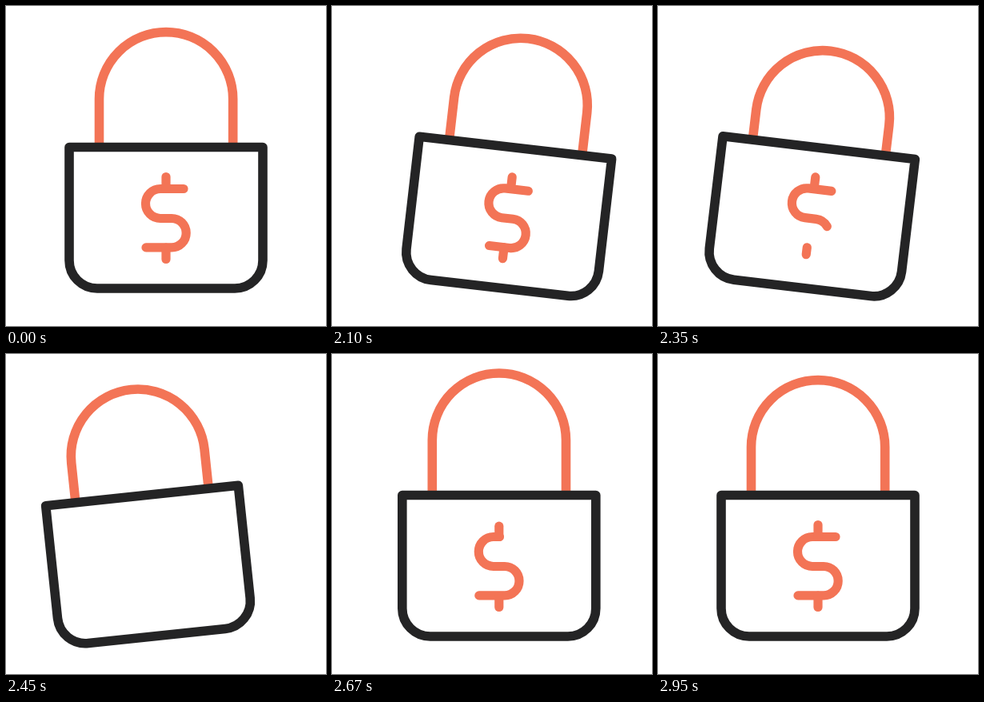
Recreate the animation shown at these times as an HTML page. Size 400 by 400 pixels, loop 2970 ms.

```html
<!DOCTYPE html>
<html lang="en">
<head>
<meta charset="utf-8">
<title>Padlock</title>
<style>
  html, body { margin: 0; width: 100%; height: 100%; overflow: hidden; background: #fff; }
  svg { display: block; width: 100vw; height: 100vh; }
  path { fill: none; stroke: #f37456; stroke-width: 11.6; stroke-linejoin: round; }
  #body { fill: #fff; stroke: #242425; }
  #dollar path { stroke-width: 11.2; stroke-linecap: round; }
</style>
</head>
<body>
<svg viewBox="0 0 400 400">
  <g id="lock">
    <path id="shackle" d="M116.5 200V116.2a83.6 83.6 0 0 1 167.2 0V200"/>
    <path id="body" d="M79 176.5H321V318a35 35 0 0 1-35 35H114a35 35 0 0 1-35-35Z"/>
    <g id="dollar">
      <path pathLength="1" d="M222 228.5H193a18.5 18.5 0 0 0 0 37H207a18.2 18.2 0 0 1 0 36.4H175"/>
      <path pathLength="1" d="M200 213.5V228.5"/>
      <path pathLength="1" d="M200 302V316.5"/>
    </g>
  </g>
</svg>
<script>
const LOOP = 2970, STEP = 25;
const lock = document.getElementById('lock');
const shackle = document.getElementById('shackle');
const strokes = document.querySelectorAll('#dollar path');

// Eased swing through turning points [ms, value]
function swing(t, ...points) {
  let value = 0;
  points.reduce(([t0, v0], [t1, v1]) => {
    const p = Math.min(1, Math.max(0, (t - t0) / (t1 - t0)));
    value += (v1 - v0) * p * p * (3 - 2 * p);
    return [t1, v1];
  });
  return value;
}

function draw(now) {
  // 40 steps a second, on a 10 ms clock
  const clock = Math.floor(now % LOOP / 10) * 10;
  const t = Math.floor((clock + 5) / STEP) * STEP;

  const x = swing(t, [1990, 0], [2160, 27], [2440, -21], [2620, 9.5], [2950, 0]);
  const angle = swing(t, [2000, 0], [2225, 15.8], [2575, -15], [2675, 0]);
  const dip = swing(t, [2000, 0], [2290, 24.6], [2650, -8.8], [2950, 0]);
  lock.setAttribute('transform', `translate(${x} 0) rotate(${angle} 200 265)`);
  shackle.setAttribute('transform', `translate(0 ${dip})`);

  // The line is wiped back to its start, then grows again from its end
  const fromEmpty = t - 2450;
  const length = 1 - Math.exp(-Math.abs(fromEmpty) / 103);
  for (const { style } of strokes) {
    style.strokeDasharray = length > .985 ? 'none' : `${length} 3`;
    style.strokeDashoffset = fromEmpty > 0 ? length - 1 : 0;
    style.visibility = length ? 'visible' : 'hidden';
  }
  requestAnimationFrame(draw);
}
draw(performance.now());
</script>
</body>
</html>
```
